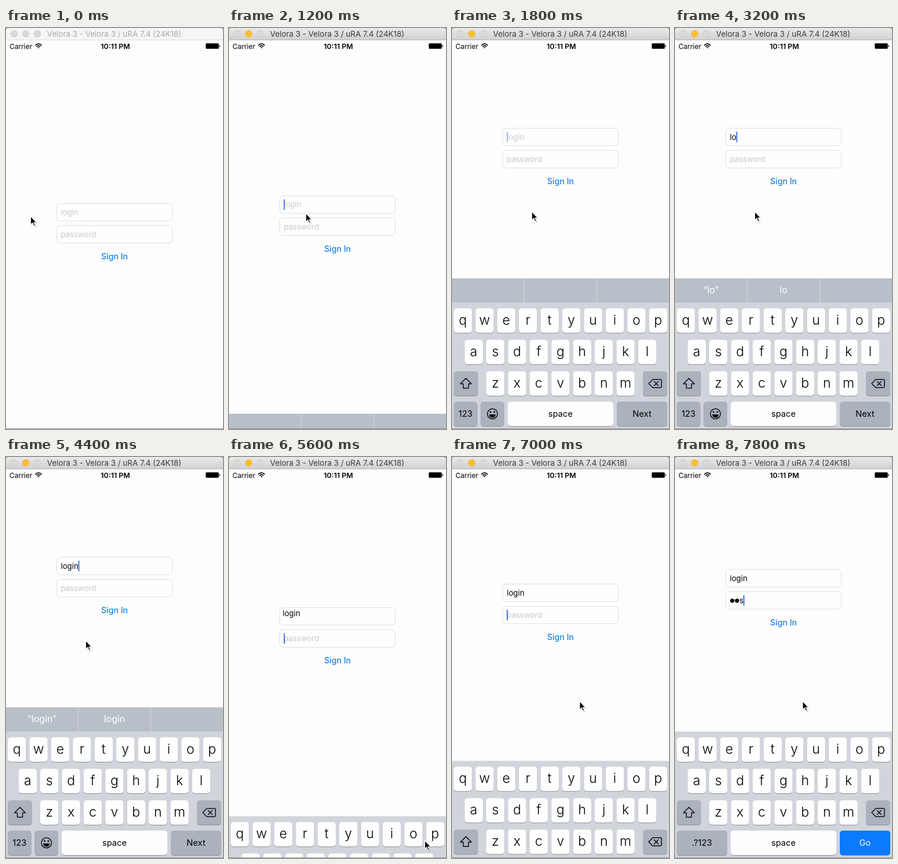
Write an HTML page that moves like this. It is 374 px wide and 688 px high and loops after 8000 ms.

```html
<!DOCTYPE html>
<html lang="en">
<head>
<meta charset="utf-8">
<title>Sign in</title>
<style>
  html, body { margin: 0; width: 100%; height: 100%; overflow: hidden; background: #fdfdfd; }
  svg { display: block; width: 374px; height: 688px; font-family: Inter, Roboto, sans-serif; font-size: 13.2px; }
  .mid { text-anchor: middle; }
  .hint { fill: #c9c9cd; }
  .box { fill: #fefefe; stroke: #dedede; }
  .icon { fill: none; stroke: #111; stroke-width: 1.5; stroke-linejoin: round; stroke-linecap: round; }
  .letter { font-size: 23px; font-weight: 300; }
  .label { font-size: 14.7px; }
</style>
</head>
<body>
<svg viewBox="0 0 374 688">
  <defs>
    <linearGradient id="chrome" x2="0" y2="1">
      <stop stop-color="#e9e9e9"/><stop offset="1" stop-color="#d1d1d1"/>
    </linearGradient>
  </defs>
  <rect width="374" height="688" fill="#fdfdfd"/>

  <rect id="titleBar" width="374" height="20"/>
  <path id="titleEdge" d="M0 20.5H374"/>
  <g id="lights"></g>
  <path d="M0 0H3Q0 0 0 3ZM374 0H371Q374 0 374 3Z" fill="#333"/>
  <text id="title" class="mid" x="186.5" y="15" font-size="13.4">Velora 3 - Velora 3 / uRA 7.4 (24K18)</text>

  <text x="6" y="35.5" font-size="12">Carrier</text>
  <g fill="none" stroke="#000" stroke-width="1.7">
    <path d="M50.5 29.8Q56 24.4 61.5 29.8M52.6 32Q56 28.8 59.4 32"/>
    <path d="M54.3 33.2Q56 31.8 57.7 33.2L56 35Z" fill="#000" stroke="none"/>
  </g>
  <text class="mid" x="188.5" y="35.5" font-size="12.4" font-weight="600">10:11 PM</text>
  <rect x="344" y="26" width="23" height="10" rx="2" fill="#555"/>
  <rect x="345" y="27" width="21" height="8" rx="1"/>
  <path d="M367.5 29V33Q369 32.5 369 31T367.5 29Z"/>

  <g id="form">
    <rect class="box" x="87.5" y="301" width="199" height="30" rx="5.5"/>
    <rect class="box" x="87.5" y="339" width="199" height="30" rx="5.5"/>
    <text id="login" y="320.5"></text>
    <text id="password" y="358.7"></text>
    <g id="dots"></g>
    <rect id="caret" width="2" height="18" fill="#4278dc"/>
    <text class="mid" x="187" y="397" font-size="14.1" font-weight="500" fill="#1c82e6">Sign In</text>
  </g>

  <g id="keyboard">
    <g id="bar">
      <rect y="-41.5" width="374" height="42" fill="#b7bfc8"/>
      <path d="M124.5-41V0M249.5-41V0" stroke="#d3d8de"/>
      <g class="mid" font-size="16" fill="#fff">
        <text id="quoted" x="62" y="-16"></text>
        <text id="guess" x="187" y="-16"></text>
      </g>
    </g>
    <rect width="374" height="218" fill="#d1d5db"/>
    <g id="keys"></g>
    <g class="icon">
      <path d="M24 130L33.5 139.5H28.5V147H19.5V139.5H14.5Z"/>
      <path d="M346 132H359Q361 132 361 134V144Q361 146 359 146H346L339 139ZM348.5 135.5L355.5 142.5M355.5 135.5L348.5 142.5"/>
    </g>
    <g id="plainRow"></g>
    <g id="secureRow"></g>
  </g>

  <path d="M0 687.5H374" stroke="#8f9296"/>
  <g id="mouse">
    <path d="M1 2V16.5L4.5 13.3L7 19L10 17.7L7.5 12.3H12Z" fill="#000" opacity=".18"/>
    <path d="M0 0V14.5L3.3 11.5L5.7 17L8 16L5.6 10.7H10Z" stroke="#fff" stroke-width="1.1"/>
  </g>
</svg>
<script>
const $ = id => document.getElementById(id);
const LOOP = 8000, STEP = 200, LEFT = 94.5;

const key = (x, y, w, text, { fill = '#fefefe', ink = '#000', kind = 'label' } = {}) => `
  <rect x="${x}" y="${y + 1}" width="${w}" height="42" rx="5" fill="#8c9097"/>
  <rect x="${x}" y="${y}" width="${w}" height="42" rx="5" fill="${fill}"/>
  <text class="mid ${kind}" x="${x + w / 2}" y="${y + (kind === 'letter' ? 28 : 26)}" fill="${ink}">${text}</text>`;
const gray = { fill: '#abb2bd' };
const letterRow = (letters, x, y) =>
  [...letters].map((c, i) => key(x + 37.4 * i, y, 31.4, c, { kind: 'letter' })).join('');

$('keys').innerHTML = letterRow('qwertyuiop', 3, 10) + letterRow('asdfghjkl', 21.6, 64) +
  letterRow('zxcvbnm', 59, 118) + key(3, 118, 42, '', gray) + key(329, 118, 42, '', gray) +
  key(96, 170, 182, 'space');
$('plainRow').innerHTML = key(3, 170, 40.5, '123', gray) + key(49.5, 170, 40.5, '', gray) +
  key(284, 170, 87, 'Next', gray) + `
  <circle class="icon" cx="69.7" cy="191" r="8.7"/>
  <circle cx="66.5" cy="188" r="1.4"/><circle cx="72.9" cy="188" r="1.4"/>
  <path d="M64 192H75.4Q74.5 197.5 69.7 197.5T64 192Z"/>`;
$('secureRow').innerHTML = key(3, 170, 87, '.?123', gray) +
  key(284, 170, 87, 'Go', { fill: '#0a7aff', ink: '#fff' });

const clamp = u => Math.min(1, Math.max(0, u));
const ease = u => u < .5 ? 4 * u ** 3 : 1 - 4 * (1 - u) ** 3;
const slide = (t, start) => ease(clamp((t - start) / 620));
const typed = (t, start) => Math.max(0, Math.floor((t - start) / STEP) + 1);

// time, x, y of the pointer tip
const pointerPath = [
  [400, 42.5, 323], [1000, 131, 318], [1200, 132.5, 318], [1600, 137.5, 315],
  [4400, 137.5, 315], [5000, 337.5, 656], [5600, 337.5, 658], [6300, 220, 419]
];
function pointerAt(t) {
  const i = pointerPath.findIndex(p => p[0] > t);
  if (i === 0) return pointerPath[0].slice(1);
  if (i < 0) return pointerPath.at(-1).slice(1);
  const [a, b] = [pointerPath[i - 1], pointerPath[i]];
  const u = clamp((t - a[0]) / (b[0] - a[0])), s = u * u * (3 - 2 * u);
  return [1, 2].map(k => a[k] + (b[k] - a[k]) * s);
}

function setText(id, value, hint, x = LEFT) {
  const el = $(id);
  el.textContent = value || hint;
  el.setAttribute('class', value ? '' : 'hint');
  el.setAttribute('x', x);
}
const show = (id, on) => $(id).setAttribute('display', on ? 'inline' : 'none');
const move = (id, x, y) => $(id).setAttribute('transform', `translate(${x} ${y})`);

function drawWindow(t) {
  const active = t >= 800;
  $('titleBar').setAttribute('fill', active ? 'url(#chrome)' : '#f5f5f5');
  $('titleEdge').setAttribute('stroke', active ? '#b6b6b6' : '#dadada');
  $('title').setAttribute('fill', active ? '#3c3c3c' : '#a9a9a9');
  $('lights').innerHTML = [14, 34, 54].map((x, i) => {
    const lit = active && i === 1;
    return `<circle cx="${x}" cy="10" r="5.7" fill="${lit ? '#fdbd2f' : '#d9d9d9'}" stroke="${lit ? '#f0b02c' : '#cbcbcb'}" stroke-width=".8"/>`;
  }).join('');
}

function drawForm(t, secure) {
  const login = 'login'.slice(0, typed(t, 3000));
  const count = typed(t, 7400);
  const falling = t >= 5400 && t < 5800;
  setText('login', login, 'login', LEFT - (falling ? 2 : 0));
  move('login', 0, falling ? -5 : 0);

  const hidden = Math.max(0, count - 1);
  setText('password', count ? 'pas'[hidden] : '', 'password', LEFT + 8.2 * hidden);
  $('dots').innerHTML = Array.from({ length: hidden }, (_, i) =>
    `<circle cx="${98.7 + 8.2 * i}" cy="354.5" r="3.6"/>`).join('');

  const field = $(secure ? 'password' : 'login');
  const filled = secure ? count : login;
  const end = filled ? +field.getAttribute('x') + field.getComputedTextLength() : LEFT;
  const lastEdit = [1000, 3800, 5200, 5800, 7400].filter(e => e <= t).pop();
  $('caret').setAttribute('x', end - .2);
  $('caret').setAttribute('y', secure ? 345 : 307);
  $('caret').setAttribute('opacity', (t - lastEdit) % 1000 < 800 ? 1 : .45);
  show('caret', t >= 1000);

  $('quoted').textContent = login && `“${login}”`;
  $('guess').textContent = login;
}

function draw(t) {
  const secure = t >= 5200;
  const firstShown = slide(t, 1018) - slide(t, 5250);
  const secondShown = slide(t, 6620);
  const barHeight = secure ? 0 : 41.5;
  const shown = firstShown + secondShown;
  drawWindow(t);
  drawForm(t, secure);
  move('form', 0, -129 * firstShown - 108 * secondShown);
  move('keyboard', 0, 688 + barHeight - shown * (217 + barHeight));
  show('keyboard', shown > 0);
  show('bar', !secure);
  show('plainRow', !secure);
  show('secureRow', secure);
  move('mouse', ...pointerAt(t));
}

const start = performance.now();
function tick() {
  const t = (performance.now() - start) % LOOP;
  draw(Math.floor(t / STEP) * STEP);
  requestAnimationFrame(tick);
}
tick();
</script>
</body>
</html>
```
